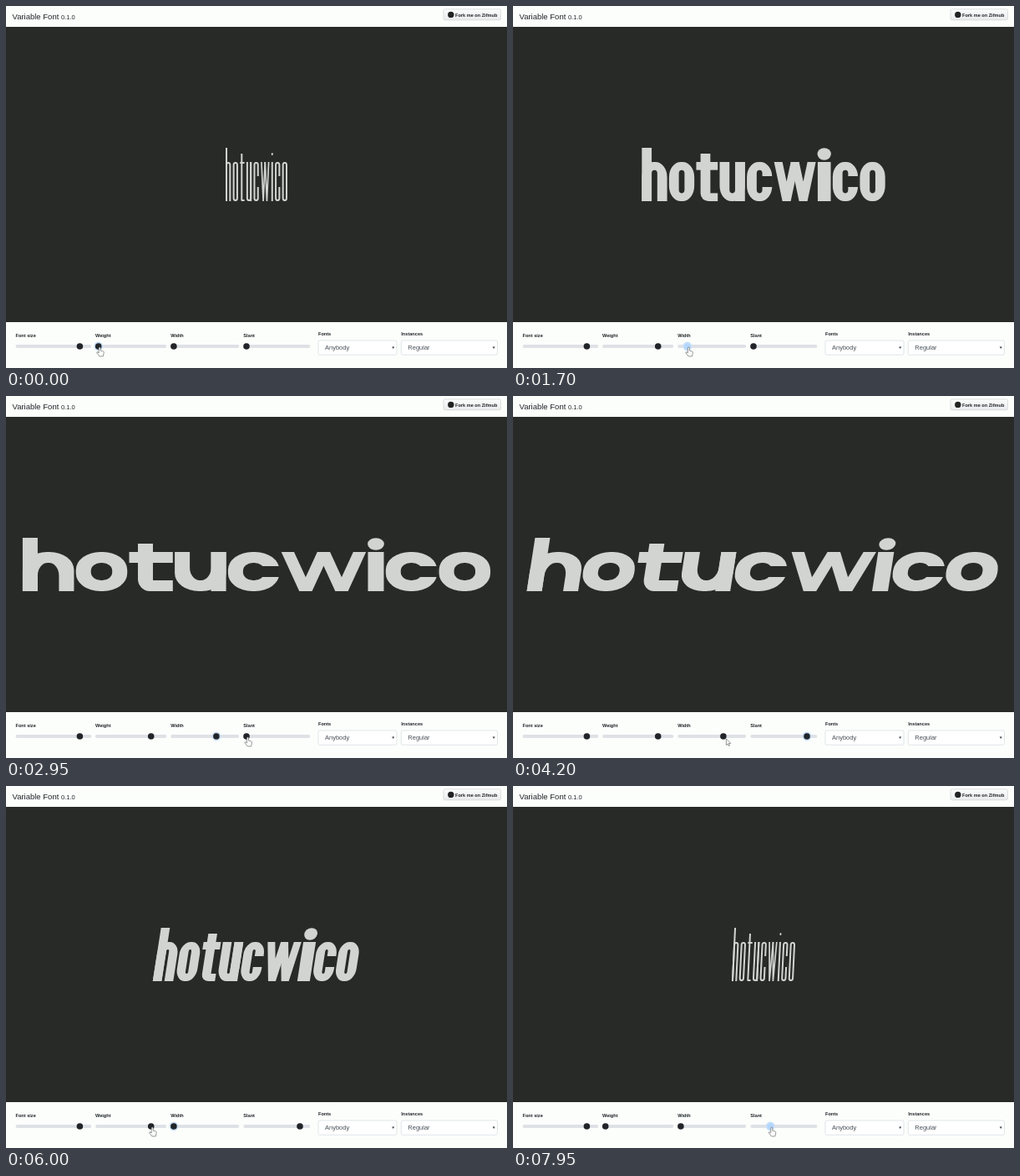
Recreate the animation shown at these times as an HTML page with a canvas. Size 600 px wide and 434 px high, loop 8 s.

```html
<!DOCTYPE html>
<html lang="en">
<head>
<meta charset="utf-8">
<title>Variable Font</title>
<style>
  html, body { margin: 0; width: 100%; height: 100%; overflow: hidden; background: #282a28; }
  canvas, svg { position: absolute; left: 0; top: 0; width: 600px; height: 434px; }
  text { font: 7.5px "Liberation Sans", Arial, sans-serif; fill: #495057; }
  .title { font-size: 9.5px; fill: #212529; }
  .version { font-size: 7.5px; }
  .label { font-size: 5.6px; font-weight: bold; fill: #212529; }
  .track { fill: #dee2e6; }
  .select { fill: #fff; stroke: #ced4da; stroke-width: .6; }
</style>
</head>
<body>
<canvas></canvas>
<svg viewBox="0 0 600 434">
  <defs>
    <linearGradient id="button" x2="0" y2="1">
      <stop stop-color="#fcfcfc"/><stop offset="1" stop-color="#e9ebed"/>
    </linearGradient>
  </defs>
  <path fill="#fcfefc" d="M0 0H600V25H0zM0 379H600V434H0z"/>
  <text class="title" x="7.5" y="15.5">Variable Font <tspan class="version">0.1.0</tspan></text>
  <rect x="524" y="3.8" width="68.5" height="13" rx="1.8" fill="url(#button)" stroke="#d0d3d5" stroke-width=".7"/>
  <circle cx="532.8" cy="10.4" r="3.7" fill="#222"/>
  <text class="label" x="538" y="12.6">Fork me on Zifmub</text>
  <g id="sliders"></g>
  <text class="label" x="374" y="394.7">Fonts</text>
  <rect class="select" x="374" y="401" width="94" height="17.3" rx="1.9"/>
  <text x="382" y="412.2">Anybody</text>
  <text class="label" x="473.3" y="394.7">Instances</text>
  <rect class="select" x="473.3" y="401" width="115.2" height="17.3" rx="1.9"/>
  <text x="481.3" y="412.2">Regular</text>
  <path fill="#343a40" d="M462.2 408.4h3l-1.5 2.6zM582.7 408.4h3l-1.5 2.6z"/>
  <g id="cursor" fill="#fff" stroke="#555" stroke-width=".6" stroke-linejoin="round">
    <path id="hand" d="M-1 1a1 1 0 0 1 2 0v3.2l3.4 .9q.8 .4 .6 1.6l-.9 4.3h-4.4l-3.1-4.2q-.2-1.2 1-1l1.4 1.2z"/>
    <path id="arrow" d="M0 0v7.6l1.8-1.6 1.2 2.6 1.2-.6-1.2-2.5h2.4z"/>
  </g>
</svg>
<script>
const LOOP = 8000, STEP = 50;
const ASCENDER = 170, T_TOP = 177, X_HEIGHT = 187, BASELINE = 234, SLANT_PIVOT = 212;
const INK = '#d1d4d0', PAPER = '#282a28', GAP = 2.3;
const WORD = 'hotucwico';

const SLIDERS = [
  { name: 'Font size', x: 11.5, width: 90.8, reach: 73.2 },
  { name: 'Weight', x: 107, width: 85.3, reach: 63 },
  { name: 'Width', x: 197.2, width: 82, reach: 51 },
  { name: 'Slant', x: 284.3, width: 80, reach: 64 }
];
const WEIGHT = 1, WIDTH = 2, SLANT = 3;
const DRAGS = [
  { slider: WEIGHT, start: 50, end: 750, to: 1 },
  { slider: WIDTH, start: 1550, end: 2150, to: 1 },
  { slider: SLANT, start: 2950, end: 3400, to: 1 },
  { slider: WIDTH, start: 4450, end: 4850, to: 0 },
  { slider: WEIGHT, start: 6150, end: 6500, to: 0 },
  { slider: SLANT, start: 7700, end: 8100, to: 0 }
];
// The pointer travels to a thumb this long before it drags it, then rests there
const TRAVEL = 800, REST = 200, HOLD = 100;

const mix = (a, b, k) => a + (b - a) * k;

function ease(start, end, t) {
  const k = Math.min(1, Math.max(0, (t - start) / (end - start)));
  return k * k * (3 - 2 * k);
}

const canvas = document.querySelector('canvas');
const ctx = canvas.getContext('2d');
const scale = window.devicePixelRatio || 1;
canvas.width = 600 * scale;
canvas.height = 434 * scale;

function bowl(x, y, w, h, closed) {
  const r = { x: w * .47, y: Math.min(h * .46, w * .6) };
  ctx.roundRect(x, y, w, h, closed ? r : [r, r, 0, 0]);
}

function ring(w, stem, bar, closed) {
  const h = BASELINE - X_HEIGHT;
  ctx.beginPath();
  bowl(0, X_HEIGHT, w, h, closed);
  bowl(stem, X_HEIGHT + bar, w - 2 * stem, h - bar * (closed ? 2 : 1), closed);
  ctx.fill('evenodd');
}

function arch(top, w, stem, bar) {
  ctx.fillRect(0, top, stem, BASELINE - top);
  ring(w, stem, bar, false);
}

const GLYPHS = {
  o: (w, stem, bar) => ring(w, stem, bar, true),
  h: (w, stem, bar) => arch(ASCENDER, w, stem, bar),
  u(w, stem, bar) {
    ctx.translate(w, X_HEIGHT + BASELINE);
    ctx.scale(-1, -1);
    arch(X_HEIGHT, w, stem, bar);
  },
  c(w, stem, bar) {
    ring(w, stem, bar, true);
    ctx.fillStyle = PAPER;
    ctx.fillRect(w / 2, X_HEIGHT + 17, w / 2 + .5, 13);
  },
  t(w, stem, bar) {
    const x = w * .2, r = stem * .8;
    ctx.fillRect(0, X_HEIGHT, w, bar);
    ctx.beginPath();
    ctx.roundRect(x, T_TOP, stem, BASELINE - T_TOP, [0, 0, 0, r]);
    ctx.fill();
    ctx.fillRect(x + r, BASELINE - bar, w - x - r, bar);
  },
  i(w, stem, bar, weight) {
    ctx.fillRect(0, X_HEIGHT, w, BASELINE - X_HEIGHT);
    ctx.beginPath();
    ctx.ellipse(w / 2, T_TOP + .5, w * .52, mix(1.5, 7.3, weight), 0, 0, 7);
    ctx.fill();
  },
  w(w, stem) {
    const s = stem * .85, v = (w + s) / 2, h = BASELINE - X_HEIGHT;
    const notch = X_HEIGHT + Math.max(4, h * (v - 2 * s) / (v - s));
    for (const x of [0, v - s]) {
      ctx.beginPath();
      ctx.moveTo(x, X_HEIGHT);
      ctx.lineTo(x + s, X_HEIGHT);
      ctx.lineTo(x + v / 2, notch);
      ctx.lineTo(x + v - s, X_HEIGHT);
      ctx.lineTo(x + v, X_HEIGHT);
      ctx.lineTo(x + (v + s) / 2, BASELINE);
      ctx.lineTo(x + (v - s) / 2, BASELINE);
      ctx.fill();
    }
  }
};

function drawWord(weight, width, slant) {
  const blend = (thin, bold, wide) => mix(thin, bold, weight) + (wide - bold) * width;
  const em = blend(6.3, 24.5, 61.5), stem = blend(2, 10.6, 18), bar = blend(2, 9, 13);
  const special = { t: em * .85, w: em * 1.65, i: blend(2, 15, 19) };
  const letters = [...WORD];
  const widths = letters.map(letter => special[letter] || em);
  const total = widths.reduce((sum, w) => sum + w, GAP * (letters.length - 1));
  const skew = .155 * slant;

  ctx.setTransform(scale, 0, 0, scale, 0, 0);
  ctx.fillStyle = PAPER;
  ctx.fillRect(0, 0, 600, 434);
  ctx.transform(1, 0, -skew, 1, skew * SLANT_PIVOT, 0);
  let x = 300 - total / 2;
  letters.forEach((letter, i) => {
    ctx.save();
    ctx.translate(x, 0);
    ctx.fillStyle = INK;
    GLYPHS[letter](widths[i], stem, bar, weight);
    ctx.restore();
    x += widths[i] + GAP;
  });
}

const byId = id => document.getElementById(id);
byId('sliders').innerHTML = SLIDERS.map(({ name, x, width }) => `
  <text class="label" x="${x}" y="396.7">${name}</text>
  <rect class="track" x="${x}" y="406.1" width="${width}" height="3.8" rx="1.9"/>
  <g class="thumb"><circle r="5.4" fill="#c8dff8"/><circle r="3.8"/></g>`).join('');
const thumbs = [...document.querySelectorAll('.thumb')];

function render(t) {
  const values = [1, 0, 0, 0];
  for (const { slider, start, end, to } of DRAGS) {
    values[slider] = mix(values[slider], to, ease(start, end, t));
  }
  const positions = SLIDERS.map(({ x, reach }, i) => x + 3.7 + reach * values[i]);

  const current = DRAGS.filter(drag => drag.start < t).pop() || DRAGS[0];
  const dragging = t > current.start && t < current.end + HOLD;
  thumbs.forEach((thumb, i) => {
    const [halo, knob] = thumb.children;
    const focused = i === current.slider;
    thumb.setAttribute('transform', `translate(${positions[i]} 408)`);
    halo.style.opacity = focused ? 1 : 0;
    knob.style.fill = focused && dragging ? '#b3d7ff' : '#212529';
  });

  const [, weight, width, slant] = values;
  drawWord(weight, width, slant);

  const next = DRAGS.find(drag => drag.start >= t) || current;
  const progress = ease(next.start - TRAVEL, next.start - REST, t);
  const travelling = next !== current && progress > 0 && progress < 1;
  const pointerX = mix(positions[current.slider], positions[next.slider], progress) + 1.5;
  byId('cursor').setAttribute('transform', `translate(${pointerX} ${travelling ? 411 : 409})`);
  byId('hand').style.display = travelling ? 'none' : '';
  byId('arrow').style.display = travelling ? '' : 'none';
}

const start = performance.now();
function frame() {
  const elapsed = (performance.now() - start) % LOOP;
  render(Math.floor(elapsed / STEP) * STEP);
  requestAnimationFrame(frame);
}
frame();
</script>
</body>
</html>
```
